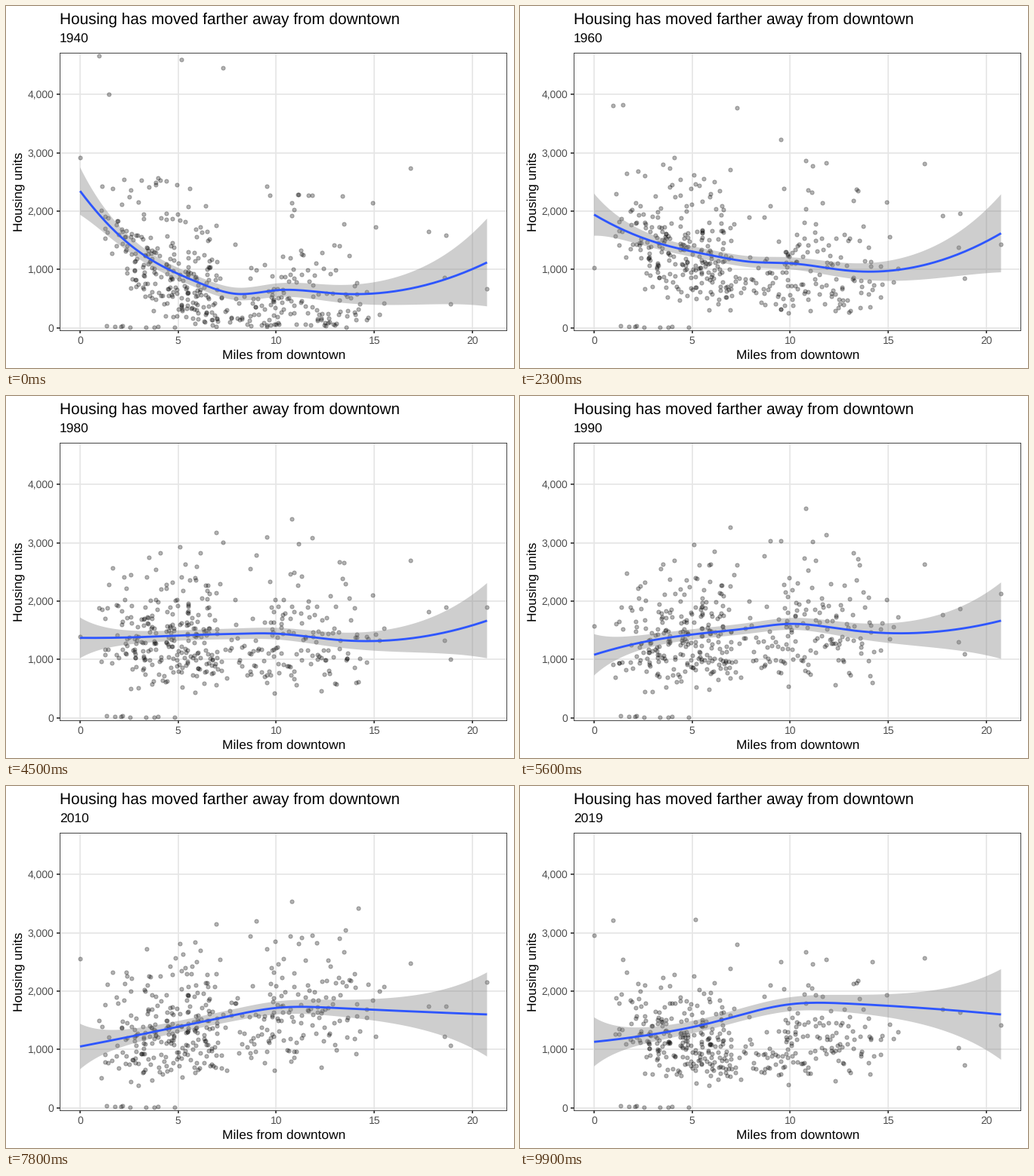
Recreate the animation shown at these times as a matplotlib script. Size 672x480 px, loop 10000 ms.

```python
import numpy as np
import matplotlib.pyplot as plt
from matplotlib.animation import FuncAnimation

W, H, DPI = 672, 480, 96
PX = 72 / DPI                                  # points per pixel
LEFT, RIGHT, TOP, BOTTOM = 71.2, 662.4, 62, 430
X0, Y0, X_SCALE, Y_SCALE = 98, 426.6, 25.945, 0.0773

plt.rcParams.update({"font.family": "Liberation Sans", "text.hinting": "none"})

YEARS = [*range(1940, 2011, 10), 2019]
TWEENS = [10, *range(22, 100, 11)]
X_MAX = 20.75

# Trend height at a few distances, per key year
KNOTS = [0, 3, 6, 8, 10, 13, X_MAX]
TRENDS = {
    1940: [2345, 1305, 780, 580, 643, 588, 1120],
    1950: [2230, 1370, 970, 780, 805, 718, 1395],
    1960: [1940, 1480, 1240, 1130, 1105, 978, 1620],
    1970: [1660, 1435, 1380, 1340, 1275, 1172, 1665],
    1990: [1080, 1330, 1465, 1540, 1610, 1505, 1665],
    2010: [1050, 1250, 1460, 1600, 1712, 1712, 1600],
    2019: [1130, 1260, 1460, 1640, 1775, 1785, 1600],
}

# Tracts that stand out: distance -> units in 1940, 1960, 1990, 2019
TRACT_YEARS = [1940, 1960, 1990, 2019]
TRACTS = {
    0: [2920, 1025, 1570, 3000],
    .95: [4670, 3815, 910, 1760],
    1.47: [4005, 3830, 1520, 1080],
    5.17: [4600, 2460, 2400, 1870],
    7.27: [4455, 3775, 2620, 1145],
    9.52: [2430, 3225, 3030, 2580],
    14.2: [320, 650, 600, 4690],
    16.83: [2735, 2810, 2635, 2405],
    17.75: [1650, 1925, 1770, 1730],
    18.57: [860, 1380, 1305, 1190],
    18.65: [1585, 1960, 1865, 1685],
    18.87: [415, 845, 1090, 1055],
    X_MAX: [665, 1435, 2130, 2175],
}


def every_year(key_years, rows):
    """Interpolate rows given for key years; one row per shown year."""
    return np.array([np.interp(YEARS, key_years, c) for c in np.transpose(rows)]).T


def spline(xk, yk, x):
    """Cubic spline through the knots, with parabolic end pieces."""
    xk, yk = np.asarray(xk, float), np.asarray(yk, float)
    n, h = len(xk), np.diff(xk)
    slope = np.diff(yk) / h
    a, b = np.eye(n), np.zeros(n)
    a[0, 1] = a[-1, -2] = -1
    for i in range(1, n - 1):
        a[i, i - 1:i + 2] = h[i - 1], 2 * (h[i - 1] + h[i]), h[i]
        b[i] = 6 * (slope[i] - slope[i - 1])
    m = np.linalg.solve(a, b)
    i = np.clip(np.searchsorted(xk, x) - 1, 0, n - 2)
    d = x - xk[i]
    return (yk[i] + d * (slope[i] - h[i] * (2 * m[i] + m[i + 1]) / 6)
            + d ** 2 * m[i] / 2 + d ** 3 * (m[i + 1] - m[i]) / (6 * h[i]))


def band(i):
    """Half width of the confidence band: flared at both ends."""
    shape = (.1 + .005 * grid + .44 * np.exp(-grid / 1.4)
             + .796 * (grid / X_MAX) ** 7)
    return shape * (645 + 7.5 * (i - 3.8) ** 2)


grid = np.linspace(0, X_MAX, 160)
curves = [spline(KNOTS, row, grid)
          for row in every_year(list(TRENDS), list(TRENDS.values()))]


def make_cloud(rng, spread=560):
    """Skewed scatter around the trend, drifting slowly from year to year."""
    x = np.append(rng.triangular(.8, 5.2, 8, 250), rng.triangular(7, 10, 16, 150))
    start, end = np.clip(rng.normal(size=(2, len(x))), -2.1, 2.1)
    ys = []
    for i, curve in enumerate(curves):
        z = np.cos(.17 * i) * start + np.sin(.17 * i) * end
        mean = np.interp(x, grid, curve)
        k = (mean / spread) ** 2               # gamma shape, Wilson-Hilferty
        ys.append(mean * np.maximum(1 - 1 / (9 * k) + z / (3 * np.sqrt(k)), .2) ** 3)
    return x, np.array(ys)


rng = np.random.default_rng(12)
cloud_x, cloud_y = make_cloud(rng)
empty_x, empty_y = rng.uniform(.7, 6.6, 9), rng.uniform(0, 40, 9)
xs = np.concatenate([cloud_x, list(TRACTS), empty_x])
units = np.hstack([cloud_y,
                   every_year(TRACT_YEARS, np.transpose(list(TRACTS.values()))),
                   np.tile(empty_y, (len(YEARS), 1))])

fig = plt.figure(figsize=(W / DPI, H / DPI), dpi=DPI, facecolor="white")
ax = fig.add_axes([LEFT / W, 1 - BOTTOM / H, (RIGHT - LEFT) / W, (BOTTOM - TOP) / H])
ax.set_xlim((LEFT - X0) / X_SCALE, (RIGHT - X0) / X_SCALE)
ax.set_ylim((Y0 - BOTTOM) / Y_SCALE, (Y0 - TOP) / Y_SCALE)
ax.set_xticks(range(0, 21, 5))
ax.set_yticks(range(0, 4001, 1000))
ax.yaxis.set_major_formatter("{x:,.0f}")
ax.tick_params(length=3.25, width=1.68 * PX, pad=2.6, color="0.2",
               labelsize=10.4, labelcolor="#4d4d4d")
ax.grid(color="#e6e6e6", linewidth=1.68 * PX)
ax.set_axisbelow(True)
for side in ax.spines.values():
    side.set(color="0.2", linewidth=0.9 * PX)


def label(x, y, text, size=13, **kw):
    return fig.text(x / W, 1 - y / H, text, fontsize=size, va="baseline",
                    rotation_mode="anchor", **kw)


label(71, 23.4, "Housing has moved farther away from downtown", 15.6)
year = label(71, 49, "1940")
label(367.2, 468, "Miles from downtown", ha="center")
label(21.3, 246.5, "Housing units", ha="center", rotation=90)

dots = ax.scatter(xs, units[0], s=(5.2 * PX) ** 2, facecolor=(0, 0, 0, .3),
                  edgecolor=(0, 0, 0, .3), linewidth=0.94 * PX, zorder=2)
ribbon, = ax.fill([0, 1, 1], [0, 0, 1], color="#868686", alpha=.4,
                  linewidth=0, zorder=2.1)
line, = ax.plot(grid, curves[0], color="#2e56ff", linewidth=2.845 * PX,
                solid_capstyle="butt", zorder=2.2)


def update(frame):
    i = int(np.searchsorted(TWEENS, frame))
    y = units[i]
    if frame in TWEENS:                        # dots pass halfway to the next year
        y = (y + units[(i + 1) % len(YEARS)]) / 2
    dots.set_offsets(np.column_stack([xs, y]))
    upper, lower = curves[i] + band(i), curves[i] - band(i)
    ribbon.set_xy(np.column_stack([np.append(grid, grid[::-1]),
                                   np.append(upper, lower[::-1])]))
    line.set_ydata(curves[i])
    year.set_text(str(YEARS[i]))
    return dots, ribbon, line, year


anim = FuncAnimation(fig, update, frames=100, interval=100, repeat=True,
                     repeat_delay=0, blit=False)
plt.show()
```
